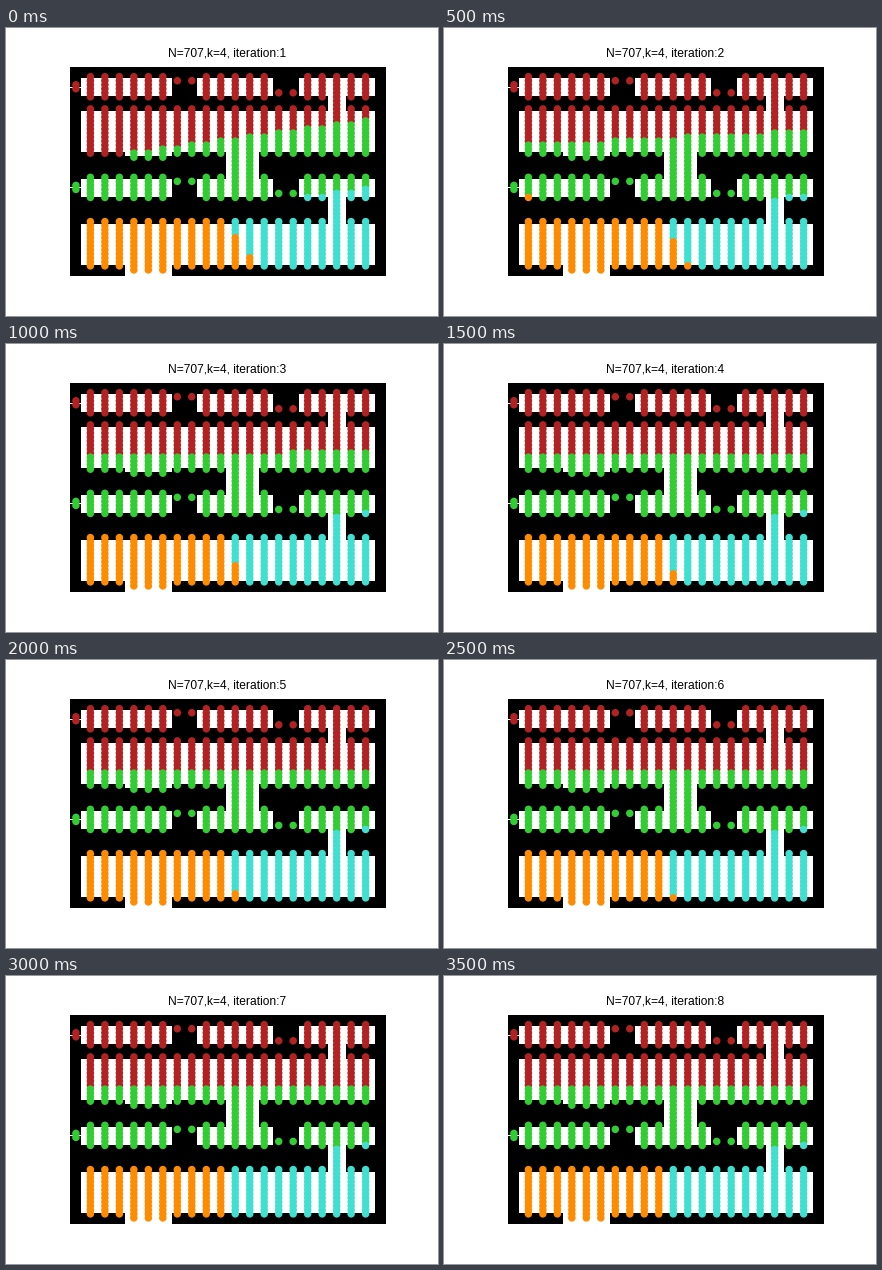
A matplotlib script for the animation above (4000 ms loop, 432 by 288 pixels).

```python
import numpy as np
import matplotlib.pyplot as plt
from matplotlib.animation import FuncAnimation
from matplotlib.patches import Rectangle

W, H, DPI = 432, 288, 72
STEPS, INTERVAL = 8, 500
COLORS = np.array(["firebrick", "limegreen", "turquoise", "darkorange"])

# Starting centroids in grid units (column, row)
START = np.array([[-0.88, 12.24], [6, 26], [12.72, 39.44], [7.43, 40.5]])


def block(cols, rows):
    return [(c, r) for c in cols for r in rows]


def corridor_rooms(top):
    """Three small rooms joined by narrow passages, plus the left entrance."""
    cols = [*range(0, 6), *range(8, 13), *range(15, 20)]
    return (block(cols, range(top, top + 6))
            + block([6, 7], [top + 1])
            + block([13, 14], [top + 4])
            + block([-1], [top + 2, top + 3]))


def hall(top):
    """A full-width room with a shallow bay below."""
    return block(range(20), range(top, top + 12)) + block([3, 4, 5], [top + 12])


def floor_points():
    pts = (corridor_rooms(0) + block([17], [6, 7]) + hall(8)
           + block([10, 11], range(20, 25))
           + corridor_rooms(25) + block([17], range(31, 36)) + hall(36))
    return np.array(pts, dtype=float)


def kmeans(pts, centers, steps):
    history = []
    for _ in range(steps):
        dist = ((pts[:, None] - centers[None]) ** 2).sum(axis=2)
        labels = dist.argmin(axis=1)
        history.append(labels)
        centers = np.array([pts[labels == k].mean(axis=0)
                            for k in range(len(centers))])
    return history


def draw_plan(ax):
    def box(x0, y0, x1, y1, color="white"):
        ax.add_patch(Rectangle((x0, y0), x1 - x0, y1 - y0,
                               facecolor=color, linewidth=0, zorder=1))

    box(64, 39, 380, 248, "black")
    for top in (50, 151):
        for x0, x1 in ((75, 166), (191, 267), (293, 369)):
            box(x0, top, x1, top + 18)
    for y in (59, 159):
        box(64, y, 75, y + 1)
    box(75, 83, 369, 124)
    box(75, 196, 369, 237)
    box(119, 124, 166, 128)
    box(119, 237, 166, 248)
    box(322, 68, 340, 83)
    box(220, 124, 253, 151)
    box(322, 169, 340, 196)


points = floor_points()
history = kmeans(points, START, STEPS)
pixels = np.array([84.4, 48.7]) + points * np.array([14.485, 4.025])

fig = plt.figure(figsize=(W / DPI, H / DPI), dpi=DPI, facecolor="white")
ax = fig.add_axes([0, 0, 1, 1])
ax.set_xlim(0, W)
ax.set_ylim(H, 0)
ax.axis("off")
draw_plan(ax)

dots = ax.scatter(pixels[:, 0], pixels[:, 1], s=36, linewidths=1.5, zorder=2)
title = ax.text(221.4, 28.8, "", ha="center", va="baseline",
                fontsize=12, family="Liberation Sans", color="black")


def update(step):
    labels = history[step]
    order = np.argsort(labels, kind="stable")  # later clusters lie on top
    dots.set_offsets(pixels[order])
    dots.set_color(COLORS[labels[order]])
    title.set_text(f"N={len(points)},k={len(COLORS)}, iteration:{step + 1}")
    return dots, title


anim = FuncAnimation(fig, update, frames=STEPS, interval=INTERVAL,
                     repeat=True, repeat_delay=0)
plt.show()
```
